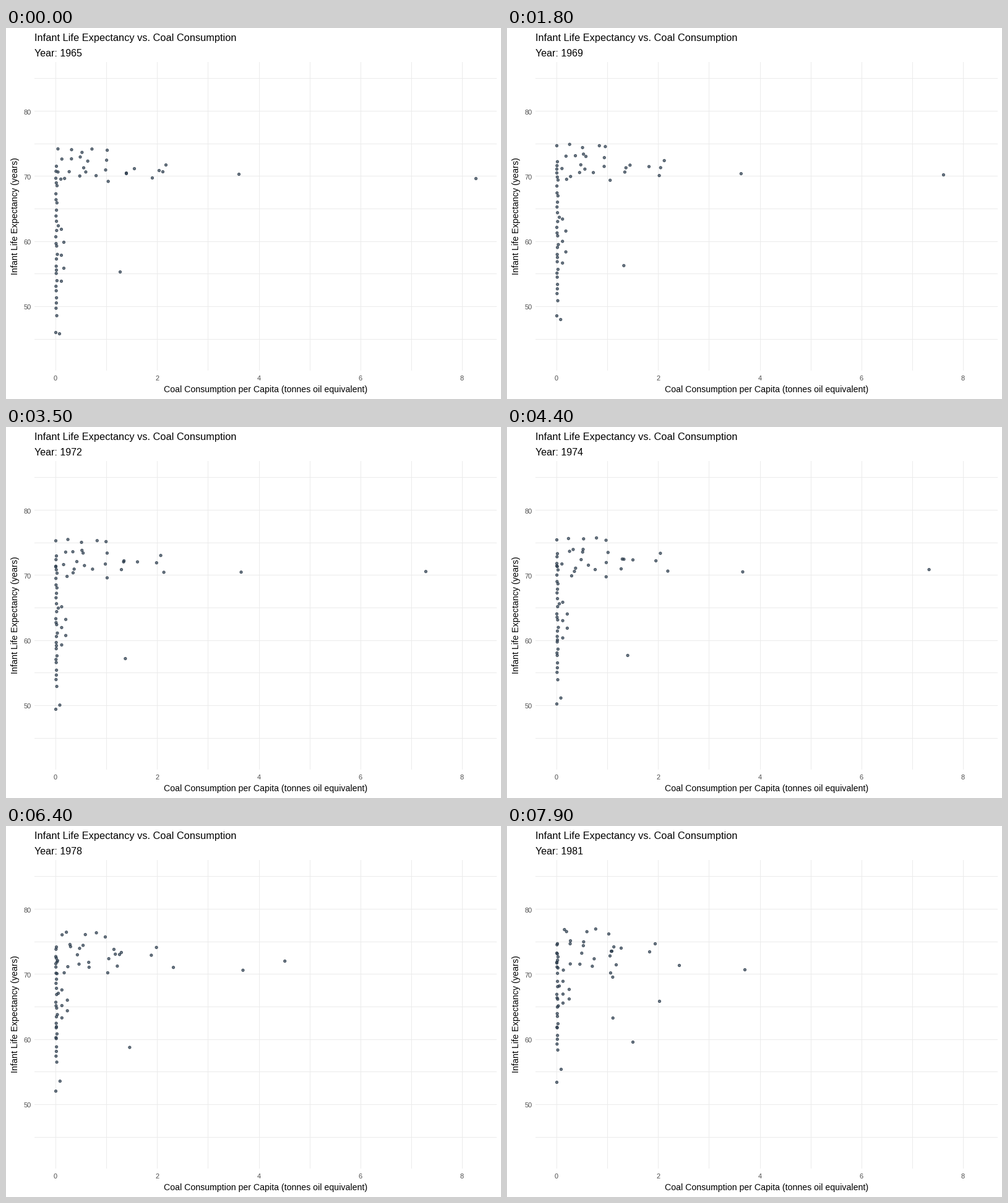
Write a matplotlib script that moves like this. It is 800 px wide and 600 px high and loops after 8 s.

```python
import numpy as np
import matplotlib.pyplot as plt
from matplotlib.animation import FuncAnimation

W, H, DPI = 800, 600, 100
PX = 72 / DPI
FRAMES, INTERVAL = 80, 100
FIRST_YEAR, YEARS_PER_FRAME = 1965, 50 / 249

rng = np.random.default_rng(12)
frame = np.arange(FRAMES)
progress = frame / (FRAMES - 1)
elapsed = frame * YEARS_PER_FRAME
years = np.arange(int(elapsed[-1]) + 2)


def mix(a, b, p=progress):
    return a + (b - a) * p


def wander(step):
    """Random yearly steps, joined by straight moves."""
    walk = np.cumsum(rng.normal(0, step, len(years)))
    return np.interp(elapsed, years, walk - walk[0])


def pulse(center, reach=4):
    return np.clip(1 - abs(frame - center) / reach, 0, 1)


def path(x, y):
    x, y = np.broadcast_to(x, FRAMES), np.broadcast_to(y, FRAMES)
    return np.column_stack([np.maximum(x, 80), y])


def column(count=28, swinging=(9, 20)):
    """Countries with almost no coal: the whole column rises and shrinks."""
    top, bottom = mix(221, 187), mix(462, 357)
    for i in range(count):
        x = 80 + min(rng.exponential(1), 6)
        y = mix(top, bottom, i / (count - 1)) + rng.normal(0, 2)
        if i in swinging:
            x = x + 90 * (pulse(55) + pulse(79))
        yield path(x, y + wander(0.5))


def cloud(rows=4, cols=5):
    """Light and medium users, in loose rows that drift upward."""
    for r in range(rows):
        for c in range(cols):
            x = 83 + 88 * ((c + rng.random()) / cols) ** 1.3
            y = 198 + 15 * r + rng.normal(0, 3) - (26 - 4 * r) * progress
            yield path(x + wander(2.5), y + wander(0.8))


def risers(count=5):
    """Fast climbers just right of the column."""
    for i in range(count):
        x = mix(89 + 4 * (i % 2), 90 + 10 * (i % 2))
        yield path(x, mix(325 + 21 * i, 250 + 10 * i) + wander(0.8))


# Start and end of the clearly separate dots
movers = [
    (194, 234, 184, 197), (194, 235, 176, 224), (207, 227, 169, 202),
    (258, 221, 239, 190), (236, 242, 278, 225), (253, 232, 230, 203),
    (247, 230, 168, 202), (376, 236, 384, 232), (184, 394, 203, 349),
    (86, 494, 87, 393),
]


def keyed(*keys):
    t, x, y = zip(*keys)
    return path(np.interp(frame, t, x), np.interp(frame, t, y))


top_user = keyed((0, 759, 243), (10, 699, 240), (18, 705, 237),
                 (25, 731, 237), (30, 676, 235), (50, 684, 228),
                 (55, 415, 239), (60, 499, 222), (65, 438, 217),
                 (70, 497, 214), (75, 496, 212), (79, 246, 283))
lowest = keyed((0, 80, 492), (20, 80, 462), (25, 80, 532),
               (35, 80, 456), (79, 80, 414))

tracks = np.array([
    *column(), *cloud(), *risers(),
    *(path(mix(x0, x1), mix(y0, y1)) for x0, y0, x1, y1 in movers),
    top_user, lowest,
])

plt.rcParams["font.family"] = "Liberation Sans"
fig = plt.figure(figsize=(W / DPI, H / DPI), dpi=DPI, facecolor="white")
ax = fig.add_axes([0, 0, 1, 1])
ax.set_xlim(-0.5, W - 0.5)
ax.set_ylim(H - 0.5, -0.5)
ax.axis("off")


def label(x, y, text, size, color="black", **kw):
    kw = {"ha": "left", "va": "baseline", **kw}
    return ax.text(x, y, text, fontsize=size * PX, color=color, **kw)


def px_x(value):
    return 80 + value * 82.13


def px_y(value):
    return 134 + (80 - value) * 10.533


grid = dict(color="#ebebeb", linewidth=PX, snap=False, zorder=1,
            solid_capstyle="butt")
for v in range(9):
    ax.plot([round(px_x(v))] * 2, [54.5, 553.5], **grid)
for v in range(45, 90, 5):
    ax.plot([45.5, 792.5], [round(px_y(v))] * 2, **grid)

for v in range(0, 10, 2):
    label(px_x(v) - 0.5, 570, str(v), 11, "#4d4d4d", ha="center")
for v in range(50, 90, 10):
    label(40, px_y(v) + 5, str(v), 11, "#4d4d4d", ha="right")

label(45, 20, "Infant Life Expectancy vs. Coal Consumption", 16.4)
label(419, 588, "Coal Consumption per Capita (tonnes oil equivalent)", 14.1,
      ha="center")
label(19, 303.5, "Infant Life Expectancy (years)", 14.2, rotation=90,
      rotation_mode="anchor", ha="center")
year = label(46, 46, "", 16)

# One size per dot keeps the centres off the pixel grid
sizes = np.full(len(tracks), (4.3 * PX) ** 2)
dots = ax.scatter(tracks[:, 0, 0], tracks[:, 0, 1], s=sizes,
                  facecolor=(0.17, 0.24, 0.31, 0.7),
                  edgecolor=(0.13, 0.19, 0.25, 0.75),
                  linewidth=0.9 * PX, zorder=3)


def update(i):
    year.set_text(f"Year: {round(FIRST_YEAR + i * YEARS_PER_FRAME)}")
    dots.set_offsets(tracks[:, i])
    return dots, year


anim = FuncAnimation(fig, update, frames=FRAMES, interval=INTERVAL,
                     repeat=True, repeat_delay=0)
plt.show()
```
